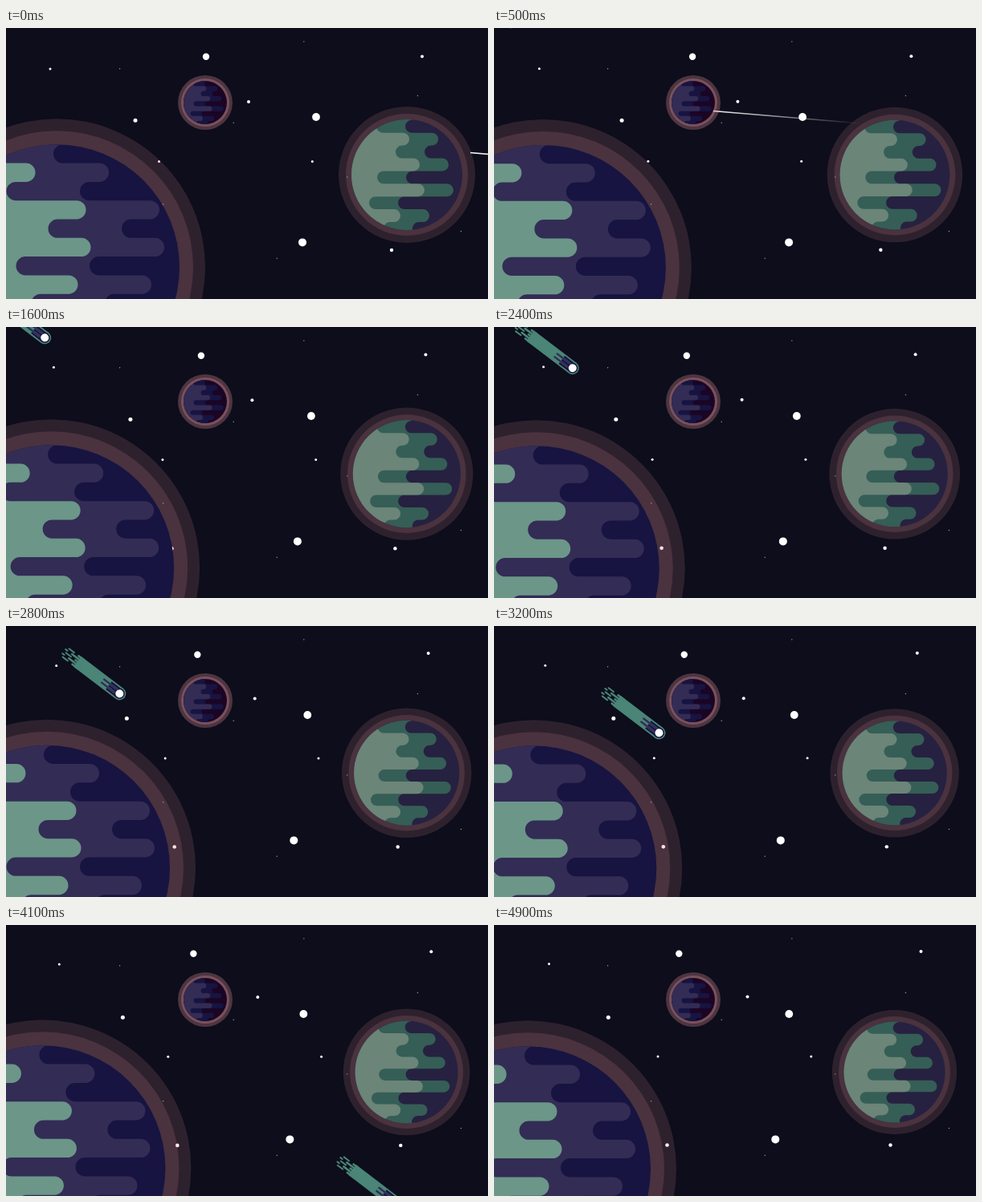
An HTML page with a canvas for the animation above (5000 ms loop, 600x338 px).

```html
<!DOCTYPE html>
<html lang="en">
<head>
<meta charset="utf-8">
<title>Planets</title>
<style>
html, body { margin: 0; width: 100%; height: 100%; overflow: hidden; background: #0d0d1b; }
canvas { display: block; width: 600px; height: 338px; }
</style>
</head>
<body>
<canvas id="stage" width="600" height="338"></canvas>
<script>
const ctx = document.getElementById('stage').getContext('2d');
const LOOP = 5000, STEP = 100, SPAN = 4900;
const DUST = 10;

// x, y, radius
const slowStars = [[249, 35.7, 4.2], [386, 111, 4.9], [369, 267.4, 5], [161, 115.2, 2.5]];
const driftStars = [
  [55, 51, 1.5], [518, 35.4, 2], [302, 92, 2], [190.5, 166.4, 1.5],
  [381.3, 166.4, 1.5], [480, 277, 2.2], [202, 277, 2.3]
];

// Tips alternate notch and tongue; the near layer repeats the far one, moved left by shift.
const broad = { top: -153, pitch: 23.3, shift: 91.5, tips: [-4, 65, 29, 128, 81, 134, 41, 118, 60] };
const narrow = { top: -68.2, pitch: 15.9, shift: 36, tips: [-2, 39, 22, 52, -1, 58, -11, 28, 7] };

function disc(x, y, r, color) {
  ctx.fillStyle = color;
  ctx.beginPath();
  ctx.arc(x, y, r, 0, Math.PI * 2);
  ctx.fill();
}

function line(x1, y1, x2, y2, width, color) {
  ctx.strokeStyle = color;
  ctx.lineWidth = width;
  ctx.beginPath();
  ctx.moveTo(x1, y1);
  ctx.lineTo(x2, y2);
  ctx.stroke();
}

function layer({ top, pitch, tips }, shift, color) {
  const r = pitch / 2, q = Math.PI / 2;
  ctx.fillStyle = color;
  ctx.beginPath();
  ctx.moveTo(-400, top - 20);
  ctx.lineTo(tips[0] - shift + r, top - 20);
  tips.forEach((tip, i) => {
    const notch = i % 2 === 0;
    ctx.arc(tip - shift + (notch ? r : -r), top + pitch * i + r, r, -q, q, notch);
  });
  ctx.lineTo(-400, top + pitch * tips.length);
  ctx.fill();
}

function planet(x, y, scale, radii, glow, bands, [near, far, night]) {
  ctx.save();
  ctx.translate(x, y);
  ctx.scale(scale, scale);
  disc(0, 0, radii[0], glow[0]);
  disc(0, 0, radii[1], glow[1]);
  disc(0, 0, radii[2], night);
  ctx.clip();
  layer(bands, 0, far);
  layer(bands, bands.shift, near);
  ctx.restore();
}

function stars(p) {
  // Golden-ratio spacing scatters the dust evenly.
  for (let i = 1; i <= DUST; i++) {
    disc(600 * (i * 0.618 % 1), 338 * ((i - 0.5) / DUST), 0.7, 'rgba(255,255,255,.6)');
  }
  slowStars.forEach(([x, y, r]) => disc(x - 18.7 * p, y, r, '#fff'));
  driftStars.forEach(([x, y, r]) => disc(x + 13.5 * p, y - 2.5 * p, r, '#fff'));
}

function meteor(t) {
  const x = 578 - 0.6222 * t, y = 155.5 - 0.105 * t;
  const tailX = x + 190, tailY = y + 16;
  const fade = ctx.createLinearGradient(x, y, tailX, tailY);
  fade.addColorStop(0, '#fff');
  fade.addColorStop(1, 'rgba(255,255,255,0)');
  line(x, y, tailX, tailY, 1.6, fade);
}

function comet(t) {
  const slope = 0.763;
  const x = 6 + 8.95 * Math.exp(0.00097 * t);
  const y = 132.2 + (x - 204) * slope;
  const teal = '#4a8577', navy = '#171442', purple = '#332c55';
  ctx.save();
  ctx.translate(x, y);
  ctx.rotate(Math.atan(slope));
  disc(0, 0, 8, teal);
  ctx.fillRect(-66, -8, 66, 16);
  ctx.lineCap = 'round';
  disc(0, 0, 6.5, navy);
  for (let i = -2; i <= 2; i++) {
    const odd = Math.abs(i % 2);
    const end = -69 - 8 * odd;
    line(end, i * 3.25, -60, i * 3.25, 2.6, teal);
    line(end - 15 + 5 * odd, i * 3.25, end - 7, i * 3.25, 2, teal);
    line(-16 - 10 * odd, i * 2.5, 0, i * 2.5, 2.4, odd ? purple : navy);
  }
  disc(0, 0, 5, '#fff');
  ctx.restore();
}

function draw(t) {
  const p = t / SPAN;
  const haze = 'rgba(230,145,152,.15)';
  const blush = 'rgba(225,145,152,.3)';
  ctx.fillStyle = '#0d0d1b';
  ctx.fillRect(0, 0, 600, 338);
  stars(p);
  meteor(t);

  const tiny = 0.391;
  planet(248, 93, tiny, [34 / tiny, 30 / tiny, 69], [blush, blush],
    narrow, ['#332c55', '#171442', '#1b0524']);
  planet(499 - 0.5 * p, 183 + 0.5 * p, 1 - 0.087 * p, [85, 76, 69], [haze, haze],
    narrow, ['#6b8578', '#355e56', '#262140']);
  planet(63 - 21 * p, 298.3 + 6 * p, 1, [185, 170, 153], [haze, haze],
    broad, ['#6b9688', '#332c55', '#171442']);

  comet(t);
}

const start = performance.now();
function tick() {
  const t = (performance.now() - start) % LOOP;
  draw(Math.floor(t / STEP) * STEP);
  requestAnimationFrame(tick);
}
tick();
</script>
</body>
</html>
```
